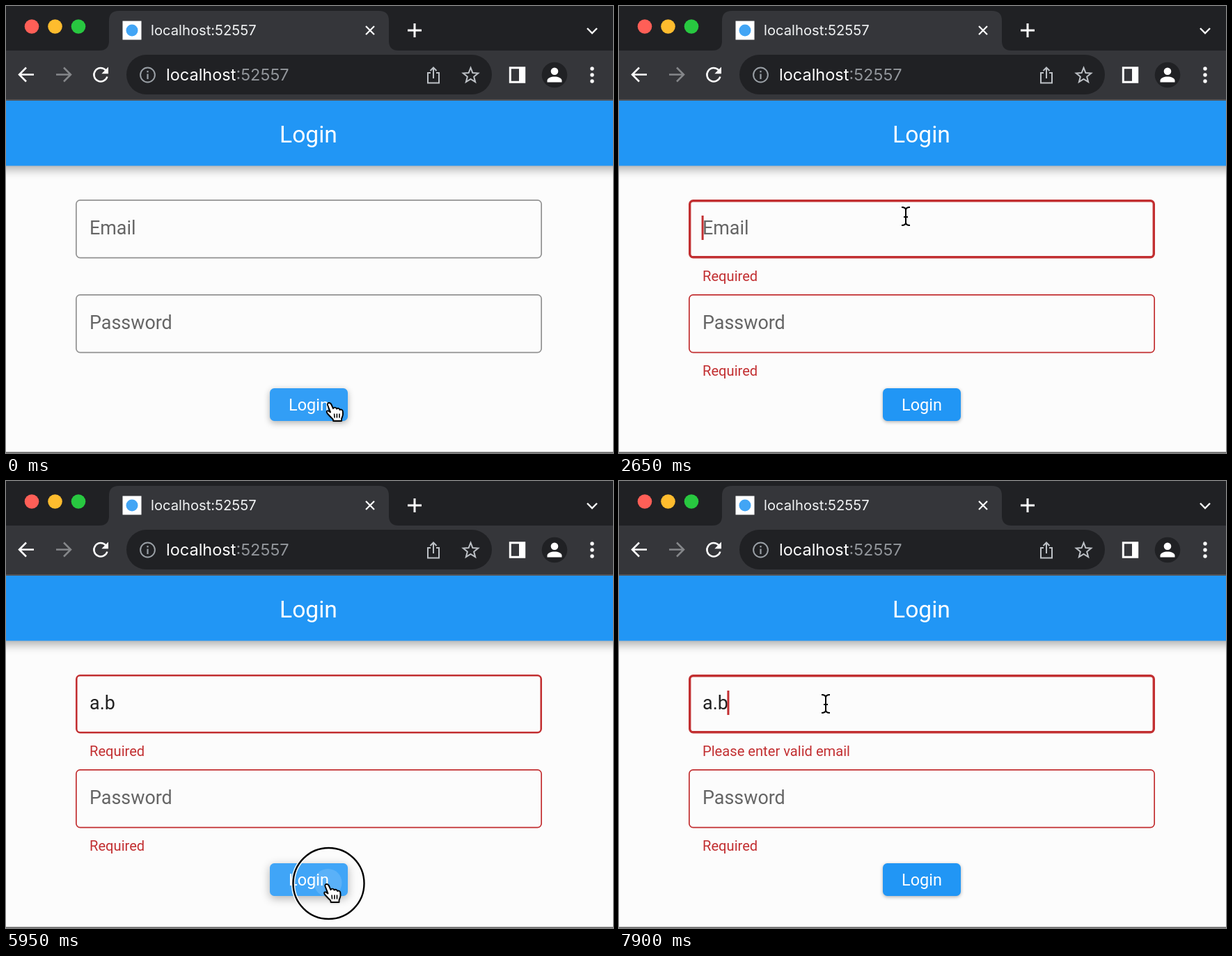
These frames come from a looping animation (872 by 642 pixels, 8000 ms). An HTML page with a canvas:

```html
<!DOCTYPE html>
<html lang="en">
<head>
<meta charset="utf-8">
<title>Login form</title>
<style>
  html, body { margin: 0; width: 100%; height: 100%; overflow: hidden; background: #fcfcfc; }
  canvas { display: block; width: 872px; height: 642px; }
</style>
</head>
<body>
<canvas id="stage" width="872" height="642"></canvas>
<script>
const ctx = document.getElementById('stage').getContext('2d');
const LOOP = 8000, STEP = 50;
const BLUE = '#2196f5', RED = [194, 47, 49], GREY = [146, 146, 146];
const UI = 'Inter, sans-serif', APP = 'Roboto, sans-serif';
const BUTTON = { x: 379, y: 549, w: 112, h: 47 };
const EMAIL = { x: 100, y: 278, w: 670, h: 84.5 };
const PASSWORD = { ...EMAIL, y: 414 };
const PRESSES = [{ at: 550, x: 467, y: 569 }, { at: 5850, x: 463.5, y: 578 }];

// Pointer stops: time, x, y
const PATH = [
  [0, 467, 569], [1350, 467, 569], [1950, 414, 336], [2200, 412, 315],
  [2500, 412, 315], [2650, 412, 302], [4350, 412, 302], [5150, 461, 575],
  [5200, 461, 575], [5250, 463.5, 578], [6850, 463.5, 578], [7150, 301, 277],
  [7250, 301, 277], [7500, 297, 320], [LOOP, 297, 320]
];
const KEYS = [[0, ''], [2700, 'a'], [3350, 'a.'], [3950, 'a.b']];

const ramp = (t, a, b) => Math.min(1, Math.max(0, (t - a) / (b - a)));
const smooth = p => p * p * (3 - 2 * p);
const easeOut = p => 1 - (1 - p) * (1 - p);
const mix = (a, b, p) => a + (b - a) * p;
const mixColor = (a, b, p) => `rgb(${a.map((v, i) => Math.round(mix(v, b[i], p)))})`;
const white = a => `rgba(255,255,255,${a})`;

function text(str, x, y, size, family, color, align = 'left') {
  ctx.font = `${size}px ${family}`;
  ctx.fillStyle = color;
  ctx.textAlign = align;
  ctx.fillText(str, x, y);
  return ctx.measureText(str).width;
}

function disc(x, y, r, color) {
  ctx.fillStyle = color;
  ctx.beginPath();
  ctx.arc(x, y, r, 0, 7);
  ctx.fill();
}

function ring(x, y, r, color, width) {
  ctx.strokeStyle = color;
  ctx.lineWidth = width;
  ctx.beginPath();
  ctx.arc(x, y, r, 0, 7);
  ctx.stroke();
}

function rect(x, y, w, h, color) {
  ctx.fillStyle = color;
  ctx.fillRect(x, y, w, h);
}

function roundRect(x, y, w, h, r) {
  ctx.beginPath();
  ctx.roundRect(x, y, w, h, r);
}

function line(d, color, width) {
  ctx.strokeStyle = color;
  ctx.lineWidth = width;
  ctx.stroke(new Path2D(d));
}

function fill(d, color) {
  ctx.fillStyle = color;
  ctx.fill(new Path2D(d));
}

function withShadow(blur, dy, alpha, draw) {
  ctx.save();
  ctx.shadowColor = `rgba(0,0,0,${alpha})`;
  ctx.shadowBlur = blur;
  ctx.shadowOffsetY = dy;
  draw();
  ctx.restore();
}

function drawBrowser() {
  rect(0, 0, 872, 64, '#202124');
  rect(0, 64, 872, 71, '#35363a');
  rect(0, 134, 872, 2, '#535458');
  fill('M134 64 Q148 64 148 50 V21 Q148 7 162 7 H536 Q550 7 550 21 V50 Q550 64 564 64 Z', '#35363a');
  ['#ff5f57', '#febc2e', '#28c840'].forEach((c, i) => disc(37 + i * 33.5, 29.5, 10.3, c));

  rect(167.5, 21.5, 27, 27, '#fff');
  disc(181, 35, 8.5, '#42a5f5');
  text('localhost:52557', 208, 42, 20.2, UI, '#f1f3f4');
  line('M517 29 L529 41 M529 29 L517 41', '#fff', 2.2);
  line('M577 35 H597 M587 25 V45', '#fff', 3);
  line('M835 32 L842 39 L849 32', '#fff', 2.4);

  line('M40 98.5 H20 M29 88.5 L19 98.5 L29 108.5', '#fff', 2.5);
  line('M72 98.5 H92 M83 88.5 L93 98.5 L83 108.5', '#85878a', 2.5);
  line('M143.2 92.2 A9.7 9.7 0 1 0 145.4 101.5', '#fff', 2.5);
  fill('M147 87.5 V97.2 H137.3 Z', '#fff');

  ctx.fillStyle = '#202124';
  roundRect(173, 70, 525, 57, 28.5);
  ctx.fill();
  ring(203.5, 99, 10.4, '#9aa0a6', 2);
  rect(202.4, 97.5, 2.2, 7.5, '#9aa0a6');
  rect(202.4, 93, 2.2, 2.4, '#9aa0a6');
  const hostWidth = text('localhost', 230, 107, 23.5, UI, '#fff');
  text(':52557', 230 + hostWidth, 107, 23.5, UI, '#92969b');

  line('M610 96 H606 V110.5 H622 V96 H618 M614 104 V89 M609.5 93 L614 88.5 L618.5 93', '#bdc1c6', 2);
  ctx.beginPath();
  for (let i = 0; i < 10; i++) {
    const r = i % 2 ? 4.9 : 11.3, a = i * Math.PI / 5 - Math.PI / 2;
    ctx.lineTo(667.5 + r * Math.cos(a), 100 + r * Math.sin(a));
  }
  ctx.closePath();
  ctx.strokeStyle = '#bdc1c6';
  ctx.lineWidth = 2;
  ctx.stroke();

  line('M724.3 88.8 H744.7 V109.2 H724.3 Z', '#fff', 3);
  rect(737, 88, 9, 22, '#fff');
  disc(788, 99, 18.3, '#202124');
  disc(788, 93.8, 5.3, '#fff');
  fill('M777.5 109.5 V107 C777.5 99.5 798.5 99.5 798.5 107 V109.5 Z', '#fff');
  [90, 99, 108].forEach(y => disc(842, y, 2.7, '#fff'));
}

function drawAppBar() {
  withShadow(13, 5, 0.32, () => rect(-20, 136, 912, 93.5, BLUE));
  text('Login', 434.5, 195.5, 33.6, APP, '#fff', 'center');
}

function drawField(box, error, focus) {
  const w = mix(1.7, 3.4, focus);
  ctx.strokeStyle = mixColor(GREY, RED, error);
  ctx.lineWidth = w;
  roundRect(box.x + w / 2, box.y + w / 2, box.w - w, box.h - w, 6.5 - w / 2);
  ctx.stroke();
}

function drawLabel(str, box, color) {
  return text(str, 120, box.y + 50, 26.9, APP, color);
}

function drawError(str, box, shown) {
  ctx.globalAlpha = shown;
  text(str, 120, box.y + 117 - 6 * (1 - shown), 20.15, APP, `rgb(${RED})`);
  ctx.globalAlpha = 1;
}

function caretOn(t) {
  if (t >= 7750) return true;
  if (t < 2250 || t >= 5850) return false;
  const start = Math.max(2250, ...KEYS.map(k => k[0]).filter(k => k <= t));
  return Math.floor((t - start) / 500) % 2 === 0;
}

function drawForm(t) {
  const error = ramp(t, 800, 1000);
  const focus = ramp(t, 2200, 2300) - ramp(t, 5850, 6050) + ramp(t, 7700, 7880);
  drawField(EMAIL, error, focus);
  drawField(PASSWORD, error, 0);

  const hint = 1 - ramp(t, 2680, 2800);
  if (hint > 0) drawLabel('Email', EMAIL, `rgba(0,0,0,${0.6 * hint})`);
  drawLabel('Password', PASSWORD, 'rgba(0,0,0,0.6)');

  const typed = KEYS.filter(k => k[0] <= t).pop()[1];
  const width = drawLabel(typed, EMAIL, '#212121');
  if (caretOn(t)) rect(120 + width - 1.4, 301, 3, 35, `rgb(${RED})`);

  drawError(t < 6100 ? 'Required' : 'Please enter valid email', EMAIL, error);
  drawError('Required', PASSWORD, error);
}

function drawButton(t) {
  const { x, y, w, h } = BUTTON;
  const hover = 1 - ramp(t, 1450, 1600) + ramp(t, 5020, 5170) - ramp(t, 6870, 6990);
  const lift = 1 - ramp(t, 1450, 1700) + ramp(t, 5020, 5220) - ramp(t, 6870, 7150);
  const press = PRESSES.find(p => t >= p.at && t < p.at + 750);
  const dt = press ? t - press.at : 0;
  const held = press ? ramp(dt, 0, 350) * (1 - ramp(dt, 300, 480)) : 0;

  const depth = 2 + 2 * lift + 4 * held;
  withShadow(depth * 2.4, depth * 0.7, 0.3, () => {
    ctx.fillStyle = BLUE;
    roundRect(x, y, w, h, 6.5);
    ctx.fill();
  });

  ctx.save();
  roundRect(x, y, w, h, 6.5);
  ctx.clip();
  rect(x, y, w, h, white(0.08 * hover));
  if (press) {
    rect(x, y, w, h, white(0.24 * held));
    const splash = 0.24 * ramp(dt, 0, 180) * (1 - ramp(dt, 500, 750));
    disc(press.x - 1, press.y - 1, dt / 5, white(splash));
  }
  ctx.restore();
  text('Login', 435, 581, 23.5, APP, '#fff', 'center');
}

function drawClick(t) {
  const press = PRESSES.find(p => t >= p.at && t < p.at + 250);
  if (!press) return;
  ring(press.x, press.y, 51, white(0.9), 5.5);
  ring(press.x, press.y, 51, '#000', 2.4);
}

function pointerAt(t) {
  const i = PATH.findIndex(p => p[0] > t);
  const [t0, x0, y0] = PATH[i - 1], [t1, x1, y1] = PATH[i];
  const p = (t0 === 6850 ? easeOut : smooth)(ramp(t, t0, t1));
  return { x: mix(x0, x1, p), y: mix(y0, y1, p) };
}

const inside = (p, b) => p.x >= b.x && p.x <= b.x + b.w && p.y >= b.y - 2 && p.y <= b.y + b.h;

function hand() {
  const d = 'M-5 4 C-6 0.5 -1.2 -0.2 0.2 3 L3 9.2 C4 7 7.2 7.2 8 9.6 C9.4 8 12 8.6 12.6 11 ' +
    'C14.2 9.8 16.6 10.8 16.8 13.2 L17 17 C17 20 15.4 22 15 24.2 V27 H3.2 L2.8 24.6 ' +
    'C0.4 22.4 -2.4 19.4 -4.6 17 C-7.6 14 -6.4 11.6 -3.6 12.6 L-1 14.4 Z';
  withShadow(3, 1, 0.3, () => fill(d, '#fff'));
  line(d, '#000', 1.9);
  line('M4.6 16.5 L5 22.5 M8.4 16.5 V22.5 M12 16.5 V22.5', '#000', 1.6);
}

function beam() {
  const d = 'M-6 -13 C-2 -13 0 -12 0 -9 V9 C0 12 -2 13 -6 13 M6 -13 C2 -13 0 -12 0 -9 ' +
    'M0 9 C0 12 2 13 6 13 M-3 1 H3';
  line(d, '#fff', 4.4);
  line(d, '#000', 2);
}

function arrow() {
  const d = 'M0 0 V23 L5.3 18 L9 26.5 L13 24.8 L9.4 16.5 H16.5 Z';
  withShadow(3, 1, 0.4, () => line(d, '#fff', 3.2));
  fill(d, '#000');
}

function drawPointer(t) {
  if (t >= 2700 && t < 4400) return;
  const p = pointerAt(t);
  ctx.save();
  ctx.translate(p.x, p.y);
  ctx.lineJoin = 'round';
  if (inside(p, BUTTON)) hand();
  else if (inside(p, EMAIL) || inside(p, PASSWORD)) beam();
  else arrow();
  ctx.restore();
}

function draw(t) {
  rect(0, 0, 872, 642, '#fcfcfc');
  drawAppBar();
  drawBrowser();
  drawForm(t);
  drawButton(t);
  rect(0, 640.5, 872, 1.5, '#616161');
  drawClick(t);
  drawPointer(t);
}

const begin = performance.now();
function tick() {
  const t = (performance.now() - begin) % LOOP;
  draw(Math.floor(t / STEP) * STEP);
  requestAnimationFrame(tick);
}
tick();
</script>
</body>
</html>
```
